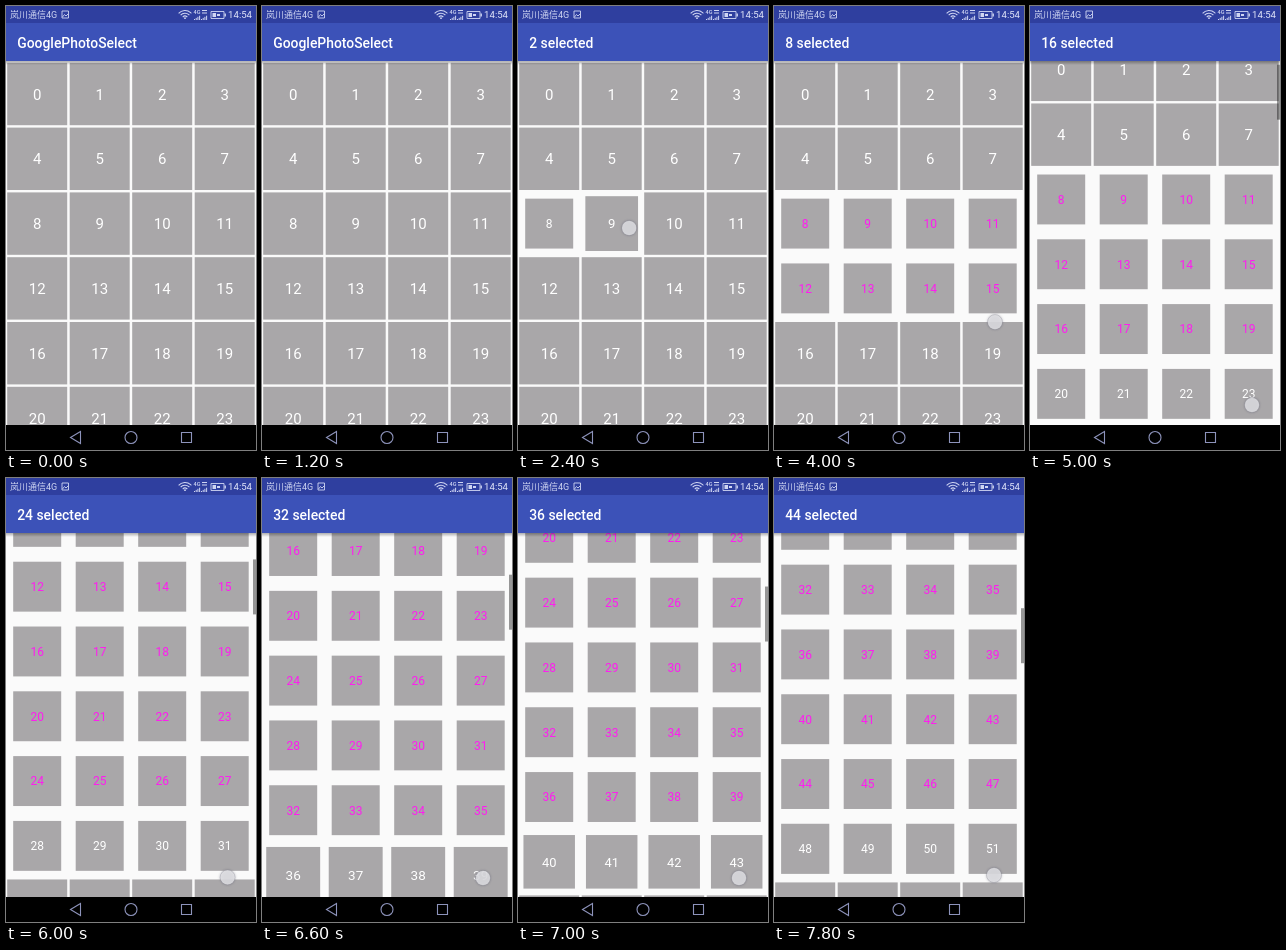
Write an HTML page with a canvas that moves like this. It is 250 px wide and 444 px high and loops after 8000 ms.

```html
<!DOCTYPE html>
<html lang="en">
<head>
<meta charset="utf-8">
<title>Drag selection grid</title>
<style>
  html, body { margin: 0; width: 100%; height: 100%; overflow: hidden; background: #fafafa; }
  canvas { display: block; width: 100vw; height: 100vh; }
</style>
</head>
<body>
<canvas id="stage"></canvas>
<script>
const W = 250, H = 444, LOOP = 8000;
const COL = 62.5, ROW = 64.8, GRID_TOP = 57, BAR_BOTTOM = 55, NAV_TOP = 419;
const FIRST = 8, LONG_PRESS = 1980, TOUCH_DOWN = 1500, SCROLL_START = 4600;

const canvas = document.getElementById('stage');
const ctx = canvas.getContext('2d');
const ratio = window.devicePixelRatio || 1;
canvas.width = W * ratio;
canvas.height = H * ratio;

// Tracks of [time, value...]
const fingerTrack = [
  [1500, 42, 222], [2000, 44, 222], [2180, 62.5, 222], [2400, 111, 222],
  [3100, 221, 226], [3350, 221, 249], [4000, 221, 316], [4700, 222, 399],
  [5600, 222, 399], [6600, 221, 400], [7000, 221, 400], [7800, 220, 397]
];
const scrollTrack = [
  [SCROLL_START, 0], [5000, 24], [5600, 106.6], [6600, 274], [7000, 352], [7800, 494.6], [8000, 530]
];

function sample(track, t) {
  const next = track.findIndex(point => point[0] > t);
  if (next === 0) return track[0].slice(1);
  if (next < 0) return track[track.length - 1].slice(1);
  const a = track[next - 1], b = track[next];
  const k = (t - a[0]) / (b[0] - a[0]);
  return a.slice(1).map((v, i) => v + (b[i + 1] - v) * k);
}

// The moment each cell joins the range dragged out from the first one
const selectedAt = [];
for (let t = LONG_PRESS, last = FIRST - 1; t < LOOP; t += 5) {
  const [x, y] = sample(fingerTrack, t);
  const [scroll] = sample(scrollTrack, t);
  const hit = Math.floor((y + scroll - GRID_TOP) / ROW) * 4 + Math.floor(x / COL);
  while (last < hit) selectedAt[++last] = t;
}

const clamp = v => Math.max(0, Math.min(1, v));
const ease = k => (1 - Math.cos(Math.PI * clamp(k))) / 2;

function rect(color, x, y, w, h) {
  ctx.fillStyle = color;
  ctx.fillRect(x, y, w, h);
}

function text(str, x, y, font, color, align = 'left') {
  ctx.font = font;
  ctx.fillStyle = color;
  ctx.textAlign = align;
  ctx.fillText(str, x, y);
}

function stroke(color, width, build) {
  ctx.strokeStyle = color;
  ctx.lineWidth = width;
  ctx.beginPath();
  build();
  ctx.stroke();
}

function drawCell(index, t, scroll) {
  const age = t - (selectedAt[index] ?? Infinity);
  const scale = 1 - 0.2 * ease((age - 50) / 300);
  ctx.save();
  ctx.translate(31.2 + (index % 4) * COL, 88 + Math.floor(index / 4) * ROW - scroll);
  ctx.scale(scale, scale);
  rect('#a9a7a9', -30, -31.2, 60, 62.4);
  text(index, 0, 5.5, '15px Roboto, sans-serif', age > 480 ? '#ff1cf0' : '#fff', 'center');
  ctx.restore();
}

function drawGrid(t, scroll) {
  const firstRow = Math.max(0, Math.floor(scroll / ROW) - 1);
  for (let i = firstRow * 4; i < (firstRow + 8) * 4; i++) drawCell(i, t, scroll);
  if (t > SCROLL_START) rect('rgba(0,0,0,.4)', 247, 55 + 0.152 * scroll, 3, 55);
}

function drawFinger(t) {
  if (t < TOUCH_DOWN) return;
  const [x, y] = sample(fingerTrack, t);
  ctx.save();
  ctx.shadowColor = 'rgba(60,60,80,.5)';
  ctx.shadowBlur = 3 * ratio;
  ctx.fillStyle = 'rgba(226,226,229,.85)';
  ctx.beginPath();
  ctx.arc(x, y, 7.3, 0, 7);
  ctx.fill();
  ctx.restore();
  stroke('rgba(150,150,160,.45)', 0.8, () => ctx.arc(x, y, 7.5, 0, 7));
}

function drawStatusBar() {
  const ink = '#cfd5f2';
  rect('#2f3f9f', 0, 0, W, 17);
  text('岚川通信4G', 4, 12.3, '9px Roboto, "Noto Sans CJK SC", "Noto Sans CJK", sans-serif', ink);
  stroke(ink, 0.9, () => {
    ctx.rect(56, 5, 6.5, 7);
    ctx.moveTo(56.5, 11);
    ctx.lineTo(58.5, 8.5);
    ctx.lineTo(60, 10);
    ctx.lineTo(62, 8);
  });
  for (const r of [3, 5.8, 8.5]) {
    stroke(ink, 1.1, () => ctx.arc(179, 13, r, -Math.PI * 0.77, -Math.PI * 0.23));
  }
  rect(ink, 178.2, 11.4, 1.6, 1.6);
  text('4G', 187.5, 7.8, '500 5.5px Roboto, sans-serif', ink);
  for (let i = 0; i < 4; i++) {
    rect(ink, 188 + i * 1.7, 13 - i * 1.1, 1, 1 + i * 1.1);
    rect(ink, 195 + i * 1.7, 13 - i * 1.1, 1, 1 + i * 1.1);
  }
  rect(ink, 196, 4, 5, 1);
  rect(ink, 196, 6.5, 5, 1);
  stroke(ink, 0.9, () => ctx.rect(205, 5.5, 13, 7));
  rect(ink, 218.5, 7.5, 1.4, 3);
  rect(ink, 206.5, 7, 3.5, 4);
  rect(ink, 211, 8, 3, 2);
  text('14:54', 246, 12.4, '9.6px Roboto, sans-serif', '#e2e6fa', 'right');
}

function drawToolbar(t) {
  const count = selectedAt.filter(at => at <= t).length;
  const shade = ctx.createLinearGradient(0, BAR_BOTTOM, 0, BAR_BOTTOM + 4);
  shade.addColorStop(0, 'rgba(0,0,0,.3)');
  shade.addColorStop(1, 'rgba(0,0,0,0)');
  rect(shade, 0, BAR_BOTTOM, W, 4);
  rect('#3c52b8', 0, 17, W, BAR_BOTTOM - 17);
  text(count ? count + ' selected' : 'GooglePhotoSelect', 11.2, 41.5,
    '500 13.9px Roboto, sans-serif', '#fff');
}

function drawNavBar() {
  const ink = '#8d93bb';
  rect('#000', 0, NAV_TOP, W, H - NAV_TOP);
  stroke(ink, 1.1, () => {
    ctx.moveTo(64.5, 431.5);
    ctx.lineTo(74.5, 425.5);
    ctx.lineTo(74.5, 437.5);
    ctx.closePath();
  });
  stroke(ink, 1.1, () => ctx.arc(125, 431.5, 6, 0, 7));
  stroke(ink, 1.1, () => ctx.rect(175.5, 426.5, 10, 10));
}

function frame(now) {
  const t = now % LOOP;
  const [scroll] = sample(scrollTrack, t);
  ctx.setTransform(ratio, 0, 0, ratio, 0, 0);
  rect('#fafafa', 0, 0, W, H);
  drawGrid(t, scroll);
  drawToolbar(t);
  drawStatusBar();
  drawNavBar();
  drawFinger(t);
  requestAnimationFrame(frame);
}
requestAnimationFrame(frame);
</script>
</body>
</html>
```
